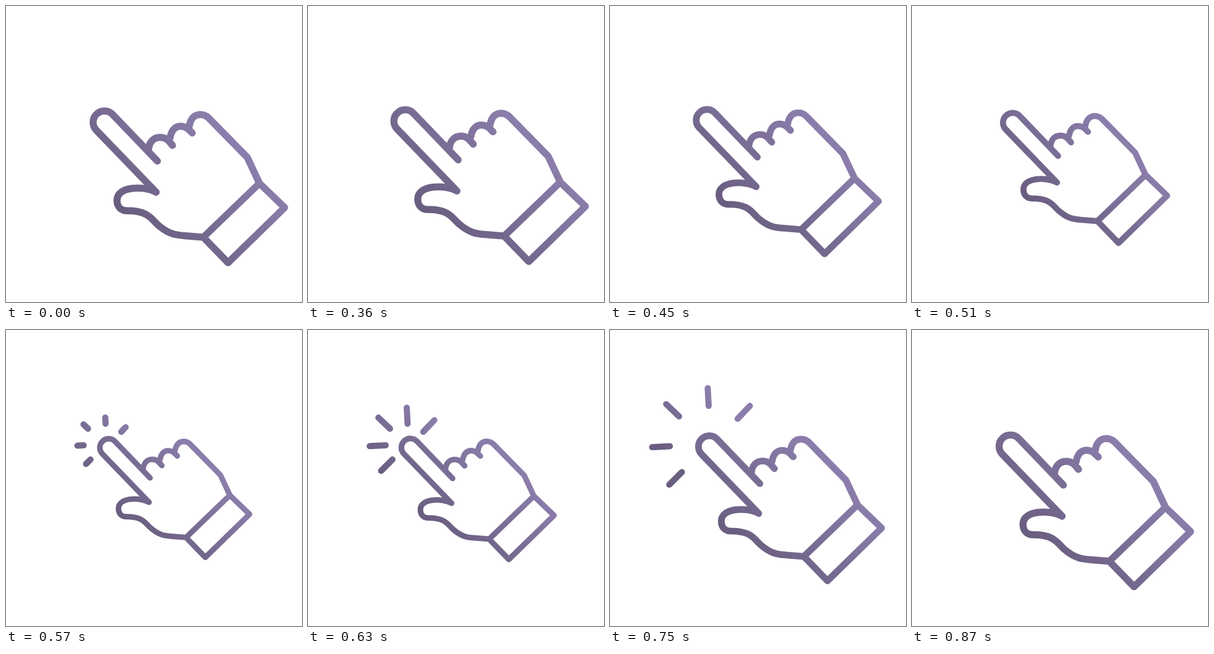
These frames come from a looping animation (480 by 480 pixels, 1.29 s). An HTML page with a canvas:

```html
<!DOCTYPE html>
<html lang="en">
<head>
<meta charset="utf-8">
<title>Tapping hand</title>
<style>
  html, body { margin: 0; overflow: hidden; background: #fff; }
  canvas { display: block; }
</style>
</head>
<body>
<canvas id="stage" width="480" height="480"></canvas>
<script>
const ctx = document.getElementById('stage').getContext('2d');
const LOOP = 1290, STEP = 30, START = 360, END = 870;
const PIVOT = { x: 191, y: 198 };
const MIN_SCALE = 0.77, TAP = 602;

const hand = new Path2D(`
  M245.5 251.5 L173 176 A18.4 18.4 0 0 0 146 201 L243.5 302
  C224 291 180 292 180 315 C180 326 187 332 196 332
  C232 331.5 236 346.5 247 355.5 C265 371 277 371.5 289 372.5 L320 375
  L411 287.5 L451.8 326.8 L360 416.3 L320 375
  M231 236 C231 220 240 213 250 213 C260 213 264 219 270 226
  M266 214 C268 202 274 195 283 195 C292 195 296 200 302 206
  M297 196 C299 182 306 176 315 176 C321 176 325 178 329 182
  L391.3 245.5 L411 287.5`);

// Inner end and outward angle of each ray
const rays = [
  [126, 187, 177], [133, 160, 223.5], [161.5, 152, 267],
  [187, 165, 313.5], [137, 210, 135]
];

function gradient(x0, y0, x1, y1) {
  const g = ctx.createLinearGradient(x0, y0, x1, y1);
  g.addColorStop(0, '#6a5e80');
  g.addColorStop(1, '#8b7dab');
  return g;
}
const handPaint = gradient(230, 370, 370, 230);
const rayPaint = gradient(120, 229, 204, 145);

const clamp = x => Math.min(1, Math.max(0, x));
const phase = (t, a, b) => clamp((t - a) / (b - a));
const ease = x => (1 - Math.cos(Math.PI * x)) / 2;

function drawHand(t) {
  const press = t < TAP
    ? ease(phase(t, 384, TAP))
    : 1 - ease(phase(t, TAP, 842) ** 0.7);
  const s = 1 - (1 - MIN_SCALE) * press;
  const nudge = 4.2 * Math.sin(Math.PI * phase(t, 330, 522));
  ctx.save();
  ctx.translate(PIVOT.x - nudge, PIVOT.y - nudge);
  ctx.scale(s, s);
  ctx.translate(-PIVOT.x, -PIVOT.y);
  ctx.lineWidth = 11.4;
  ctx.strokeStyle = handPaint;
  ctx.stroke(hand);
  ctx.restore();
}

function drawRays(t) {
  if (t < 570 || t >= 850) return;
  const outer = 26 + (Math.min(t, 756) - 630) * 0.265;
  const inner = t < 750
    ? Math.max(0, t - 630) * 0.24
    : 29 + 28 * phase(t, 750, 850);
  ctx.lineWidth = 10;
  ctx.strokeStyle = rayPaint;
  ctx.beginPath();
  for (const [x, y, deg] of rays) {
    const dx = Math.cos(deg * Math.PI / 180);
    const dy = Math.sin(deg * Math.PI / 180);
    ctx.moveTo(x + dx * inner, y + dy * inner);
    ctx.lineTo(x + dx * outer, y + dy * outer);
  }
  ctx.stroke();
}

function draw(now) {
  const time = now % LOOP;
  const t = time < START || time >= END ? 0 : Math.floor(time / STEP) * STEP;
  ctx.fillStyle = '#fff';
  ctx.fillRect(0, 0, 480, 480);
  ctx.lineCap = ctx.lineJoin = 'round';
  drawHand(t);
  drawRays(t);
}

const begin = performance.now();
function tick() {
  draw(performance.now() - begin);
  requestAnimationFrame(tick);
}
tick();
</script>
</body>
</html>
```
